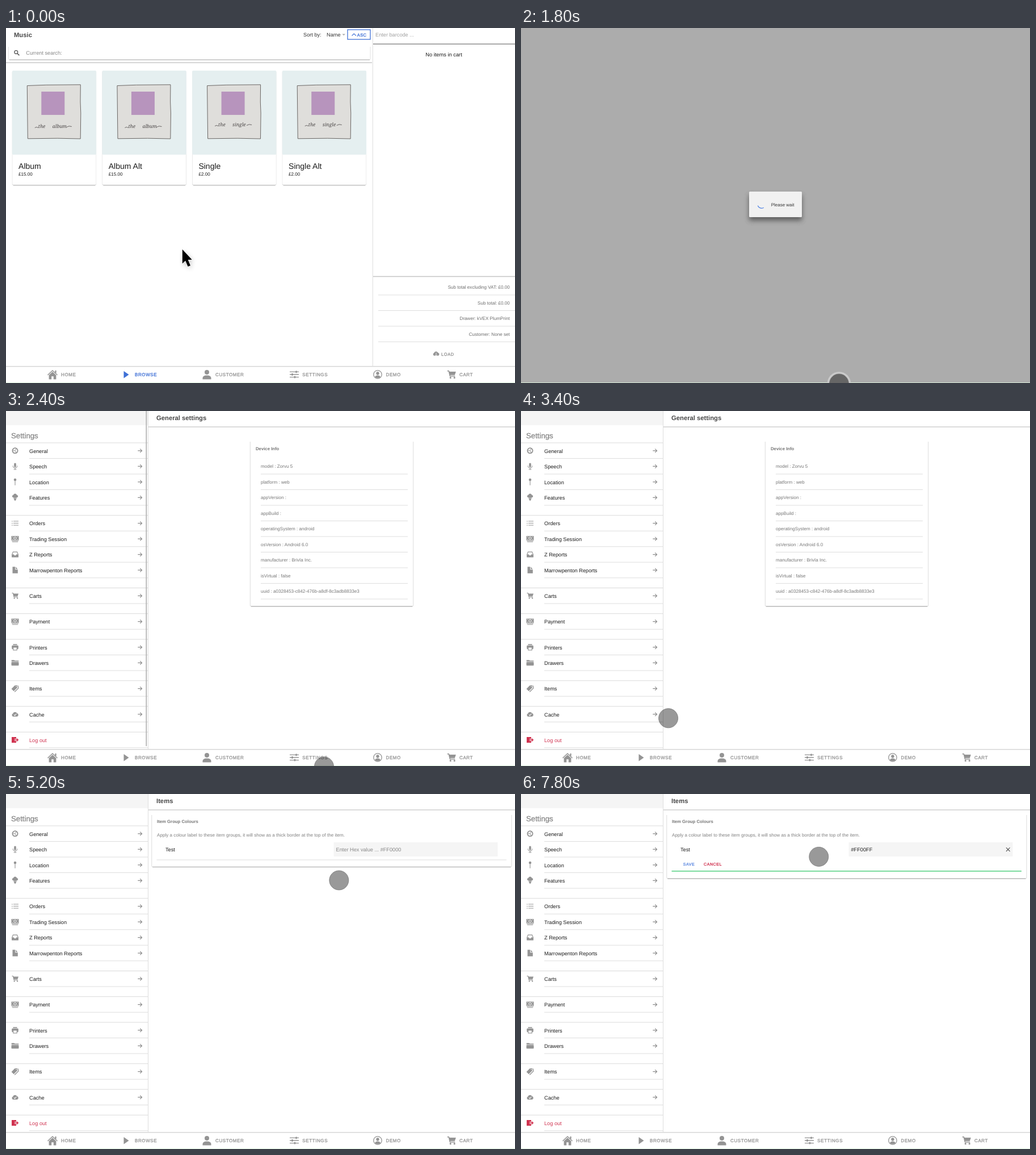
Animation, 897 px wide and 625 px high, one loop 8 s. Source, as an HTML page:

```html
<!DOCTYPE html>
<html lang="en">
<head>
<meta charset="utf-8">
<title>Till settings</title>
<style>
  html, body { margin: 0; width: 100%; height: 100%; overflow: hidden; background: #fff; }
  svg { display: block; width: 100%; height: 100%; font-family: "Liberation Sans", Arial, sans-serif; text-rendering: geometricPrecision; }
  .script { font-family: "Noto Serif", serif; font-style: italic; }
</style>
</head>
<body>
<svg id="stage" viewBox="0 0 897 625" xmlns="http://www.w3.org/2000/svg"></svg>
<script>
const LOOP = 8000, STEP = 200;
const GREY = '#949494', BLUE = '#3f70d6', RED = '#d03350';

// y is the vertical centre of the text
const text = (x, y, s, size = 9.2, fill = '#1c1c1c', more = '') =>
  `<text x="${x}" y="${y + size * 0.35}" font-size="${size}" fill="${fill}" ${more}>${s}</text>`;
const bold = (x, y, s, size, fill) => text(x, y, s, size, fill, 'font-weight="700"');
const label = (x, y, s, size, fill, gap = 0.6) =>
  text(x, y, s, size, fill, `stroke="${fill}" stroke-width=".3" letter-spacing="${gap}"`);
const rect = (x, y, w, h, fill, more = '') =>
  `<rect x="${x}" y="${y}" width="${w}" height="${h}" fill="${fill}" ${more}/>`;
const path = (d, fill = GREY, more = '') => `<path d="${d}" fill="${fill}" ${more}/>`;
const stroke = (d, color = GREY, width = 1, more = '') =>
  `<path d="${d}" fill="none" stroke="${color}" stroke-width="${width}" ${more}/>`;
const hline = (x1, x2, y, color = '#dedede', width = 1) => stroke(`M${x1} ${y}H${x2}`, color, width);
const circle = (x, y, r, fill = GREY, more = '') =>
  `<circle cx="${x}" cy="${y}" r="${r}" fill="${fill}" ${more}/>`;
const at = (x, y, body, scale = 1) => `<g transform="translate(${x} ${y}) scale(${scale})">${body}</g>`;
const group = (id, body) => `<g id="${id}">${body}</g>`;

// Icons are drawn around 0,0
const cloud = path('M-3.5 4.5A3 3 0 0 1-4-1.2A4 4 0 0 1 3.4-1.8A3.2 3.2 0 0 1 3.5 4.5Z');
const note = rect(-6.5, -5, 13, 7.5, GREY) + circle(0, -1.2, 2.2, GREY, 'stroke="#fff"') +
  stroke('M-5-3.5h1.5M3.5-3.5h1.5M-5 1h1.5M3.5 1h1.5', '#fff', 0.8) +
  stroke('M-6 3.7H6M-5 5.4H5', GREY, 0.9);
const cart = stroke('M-7-6h2.6l2 8.6H6', GREY, 1.5) + path('M-4.5-4.8H7.5L5.6 1H-3Z') +
  circle(-1.6, 5.4, 1.5) + circle(5, 5.4, 1.5);
const person = circle(0, -4, 4) + path('M-7.5 8.5V6Q-7 1.5 0 1.5T7.5 6V8.5Z');
const icons = {
  general: circle(0, 0, 4.6, 'none', `stroke="${GREY}" stroke-width="1.8"`) +
    stroke('M-4 0H0L2.2-4M0 0L2.2 4', GREY, 1),
  speech: rect(-1.8, -5.8, 3.6, 7.6, GREY, 'rx="1.8"') + stroke('M-3.8-1V0A3.8 3 0 0 0 3.8 0V-1M0 3V6M-2.4 5.6H2.4'),
  location: circle(0, -3.8, 2.3) + stroke('M0-2V6', GREY, 1.1),
  features: path('M-5-1A2.7 2.7 0 0 1-3-4.6A3.2 3.2 0 0 1 3-4.6A2.7 2.7 0 0 1 5-1Q3 1 0 .6Q-3 1-5-1Z') + path('M-3 1.2H3L0 6.4Z'),
  orders: stroke('M-3-3.5H6M-3 0H6M-3 3.5H6', GREY, 1.1) + stroke('M-5.8-3.5h1.4M-5.8 0h1.4M-5.8 3.5h1.4', GREY, 1.3),
  note,
  tray: stroke('M-5.3 4.4V0L-3.6-4.4H3.6L5.3 0V4.4Z', GREY, 1.2) + path('M-5.5 0H-2Q-1.6 2 0 2T2 0H5.5V4.8H-5.5Z'),
  file: path('M-4.5-5.8H.2V-.8H4.8V5.8H-4.5Z') + path('M1.2-5.6L4.6-1.8H1.2Z'),
  cart: at(0, 0, cart, 0.8),
  printer: rect(-5.8, -3, 11.6, 6.4, GREY, 'rx="1.4"') + rect(-3.6, -5.4, 7.2, 1.7, GREY) +
    rect(-3.2, 0.2, 6.4, 5, '#fff', `stroke="${GREY}" stroke-width="1.1"`),
  folder: path('M-6.3-2V-4.8H-1.6L-.4-3.8H6.3V-2Z') + rect(-6.5, -1.4, 13, 6.4, GREY, 'rx="1"'),
  tags: path('M-6.4.6L-.6-5.2L4-5.8L3.6-1.4L-2.4 4.8Z') + stroke('M5.4-5L5.8-.6L-.8 6', GREY, 1.3) + circle(2, -3.8, 0.8, '#fff'),
  cache: at(0, 0, cloud, 0.95) + stroke('M-2 .8L-.4 2.3L2.3-.8', '#fff', 1.1),
  exit: path('M-6-5H2V-2H-1V2H2V5H-6Z', RED) + stroke('M-1 0H5M2.8-2.4L5.3 0L2.8 2.4', RED, 1.4)
};

const nav = [
  ['HOME', 97, at(82, 610, path('M-9 .5L0-8L9 .5L8 1.6L0-6L-8 1.6Z') +
    path('M-6.4 1.2L0-4.8L6.4 1.2V8.5H1.8V3.2H-1.8V8.5H-6.4Z') + rect(4.4, -7, 2.2, 4.5, GREY))],
  ['CUSTOMER', 369, at(354, 610, person)],
  ['SETTINGS', 522.3, at(508, 610, stroke('M-8-4.6H8M-8 0H8M-8 4.6H8', GREY, 1.4) +
    [[3.5, -4.6], [-3.5, 0], [1, 4.6]].map(([x, y]) => rect(x - 1.3, y - 1.9, 2.6, 3.8, GREY, 'rx="1"')).join(''))],
  ['DEMO', 669.5, at(655, 610, circle(0, 0, 7.2, 'none', `stroke="${GREY}" stroke-width="1.3"`) +
    circle(0, -2, 2.7) + path('M-5 4.4Q-3.6 1.6 0 1.6T5 4.4Q3 6.6 0 6.6T-5 4.4Z'))],
  ['CART', 799, at(785, 610, cart, 1.05)]
];
const browseTab = color => path('M207.5 604L216.5 610.3L207.5 616.5Z', color) + label(227, 610.3, 'BROWSE', 8, color);
const navBar = hline(0, 897, 595.8, '#cfcfcf', 1.3) +
  nav.map(([s, x, icon]) => icon + label(x, 610.3, s, 8, GREY)).join('');

function product(i, name, price, kind) {
  const x = 10.8 + i * 158.65, y = kind === 'album' ? 172.5 : 169.5;
  return rect(x, 75.5, 148.3, 201.5, '#d9d9d9', 'rx="2.5"') + hline(x + 2, x + 146.5, 276.8, '#bdbdbd', 1.2) +
    rect(x + 0.5, 75.5, 147.3, 200.5, '#fff', 'rx="2"') +
    rect(x, 75, 148.3, 148, '#e5eff0', 'rx="2"') +
    at(x, 0, path('M26.5 101.5L60 100.3L120.5 99.8L120.2 130L121 150L120.4 195L80 194.2L27.5 194.8L27 150Z',
      '#dfdedb', 'stroke="#6b6765" stroke-width="1"') +
      rect(51.5, 112, 41, 41, '#b794bd') +
      text(46, y, 'the', 8.6, '#4a4646', 'class="script"') +
      text(71, y, kind, 8.6, '#4a4646', 'class="script"') +
      stroke(`M40 ${y + 3}q3-2 6 0M96 ${y + 2}q4-3 9-1`, '#4a4646', 0.8)) +
    text(x + 11.3, 243, name, 14) + text(x + 11.3, 257.5, price, 8.1);
}

const totals = ['Sub total excluding VAT: £0.00', 'Sub total: £0.00', 'Drawer: kVEX PlumPrint', 'Customer: None set'];
const browse = bold(14, 12.3, 'Music', 11.25, '#484848') +
  text(524, 12, 'Sort by:', 9.2, '#333') + text(565, 12, 'Name', 9.2, '#333') + path('M592.5 10.5H598L595.2 13.3Z', '#aaa') +
  rect(602, 3, 40, 17, '#fff', `stroke="${BLUE}" stroke-width="1.3"`) +
  stroke('M609.5 13.7L613.2 10L616.9 13.7', BLUE, 1.2) + label(618.7, 12, 'ASC', 7.6, BLUE, 0.4) +
  stroke('M4.5 33V54Q4.5 56 6.5 56H640Q642 56 642 54V33', '#dfdfdf', 0.9) + hline(6, 641, 56, '#c6c6c6', 1.4) +
  circle(17.8, 42.6, 2.9, 'none', 'stroke="#555" stroke-width="1.3"') + stroke('M20 45L23.4 48.2', '#555', 1.6) +
  text(35.3, 44, 'Current search:', 9.2, '#858585') + hline(0, 645, 61, '#cacaca', 1.6) +
  product(0, 'Album', '£15.00', 'album') + product(1, 'Album Alt', '£15.00', 'album') +
  product(2, 'Single', '£2.00', 'single') + product(3, 'Single Alt', '£2.00', 'single') +
  stroke('M646.3 0V595', '#dcdcdc') +
  text(651, 12, 'Enter barcode ...', 9.2, '#a0a0a0') + hline(647, 897, 28.3, '#8d8d8d', 1.5) +
  text(771.5, 46.8, 'No items in cart', 9.3, '#1c1c1c', 'text-anchor="middle"') +
  hline(647, 897, 437.6, '#c4c4c4', 1.5) +
  totals.map((s, i) => text(887.7, 456.2 + i * 27.5, s, 8.1, '#6d6d6d', 'text-anchor="end"') +
    hline(656, 897, 470 + i * 27.5)).join('') +
  at(758, 573, cloud, 0.9) + stroke('M758 571.5V577.5M756 575.5L758 577.8L760 575.5', '#fff', 0.8) +
  label(767, 574, 'LOAD', 7.5, GREY) + browseTab(BLUE);

const menu = [
  [['General', 'general'], ['Speech', 'speech'], ['Location', 'location'], ['Features', 'features']],
  [['Orders', 'orders'], ['Trading Session', 'note'], ['Z Reports', 'tray'], ['Marrowpenton Reports', 'file']],
  [['Carts', 'cart']], [['Payment', 'note']],
  [['Printers', 'printer'], ['Drawers', 'folder']],
  [['Items', 'tags']], [['Cache', 'cache']], [['Log out', 'exit']]
];
function sideMenu() {
  let y = 56, out = rect(0, 0, 250, 25, '#f5f5f5') + label(9, 43, 'Settings', 13.2, '#888', 0);
  for (const rows of menu) {
    out += hline(0, 250, y, '#dadada');
    for (const [name, icon] of rows) {
      const mid = y + 14.2, last = icon === 'exit';
      out += at(16, mid - 0.4, icons[icon]) + text(41, mid + 0.2, name, 9.2, last ? RED : '#1c1c1c');
      if (!last) out += stroke(`M232.3 ${mid - 0.3}H239.4M236.2 ${mid - 3.6}L239.6 ${mid - 0.3}L236.2 ${mid + 3}`, '#8c8c8c', 1.1);
      y += 27.5;
      out += hline(41, 250, y);
    }
    y += 17.75;
  }
  return out + stroke('M250.5 0V595', '#dedede') + hline(251, 897, 28, '#cfcfcf', 1.6) + browseTab(GREY);
}

const panel = (x1, x2, top, bottom) =>
  stroke(`M${x1} ${top}V${bottom - 2}Q${x1} ${bottom} ${x1 + 2} ${bottom}H${x2 - 2}Q${x2} ${bottom} ${x2} ${bottom - 2}V${top}`, '#dcdcdc') +
  hline(x1 + 1.5, x2 - 1.5, bottom, '#bdbdbd', 1.5);

const device = ['model : Zorvu 5', 'platform : web', 'appVersion :', 'appBuild :', 'operatingSystem : android',
  'osVersion : Android 6.0', 'manufacturer : Brivla Inc.', 'isVirtual : false', 'uuid : a0328453-c842-476b-a8df-8c3adb8833e3'];
const general = bold(265, 12.5, 'General settings', 11.25, '#484848') + panel(430.3, 717.7, 54, 344) +
  bold(440, 66, 'Device Info', 7.75, '#777') +
  device.map((s, i) => text(449, 97.5 + i * 27.5, s, 8.1, '#777') + hline(449, 708, 111 + i * 27.5)).join('');

const items = bold(265, 12.5, 'Items', 11.25, '#484848') + bold(266, 47.8, 'Item Group Colours', 7.75, '#777') +
  text(266, 72, 'Apply a colour label to these item groups, it will show as a thick border at the top of the item.', 8.15, '#808080') +
  group('empty', text(275, 93.3, 'No Available Item Groups') + hline(275, 882, 106) + panel(256.8, 891, 37, 119)) +
  group('filled', rect(577.5, 85, 289, 25, '#f5f5f5') + text(281, 98, 'Test') +
    text(581.5, 98, '', 9.2, '#888', 'id="hex"') + '<path id="rule" fill="none"/>' +
    group('closed', panel(256.8, 891, 37, 128.5)) +
    group('open', panel(256.8, 891, 37, 149) + label(285.7, 123.3, 'SAVE', 7, '#5b88e0') +
      label(322, 123.3, 'CANCEL', 7, RED) + stroke('M855 94.3L861.6 101M861.6 94.3L855 101', '#555', 1.1)) +
    rect(581.7, 92, 1, 11, '#333', 'id="caret"'));

const wait = rect(0, 0, 897, 625, '#acacac') +
  rect(402, 288, 93, 45, '#444', 'filter="url(#soft)" opacity=".75" transform="translate(0 6)"') +
  rect(402, 288, 93, 45, '#f1f1f1', 'rx="1.5"') +
  stroke('M-6.8 2.6A7.3 7.3 0 0 1-1.5-7.1', '#4d80e4', 1.3, 'id="spinner"') +
  text(440.8, 311, 'Please wait', 7.95, '#333');

const stage = document.getElementById('stage');
stage.innerHTML = '<defs><filter id="soft" x="-30%" y="-60%" width="160%" height="220%"><feGaussianBlur stdDeviation="4.5"/></filter></defs>' +
  rect(0, 0, 897, 625, '#fff') + group('browse', browse) +
  group('settings', sideMenu() + group('general', general) + group('items', items) +
    rect(246.4, 0, 1.8, 590, '#b3b3b3', 'id="scroll"')) +
  navBar + group('wait', wait) + hline(0, 897, 624.7, '#dcf3dc') +
  group('arrow', path('M312 393V418L318 413L322 423L327 421L322 411H330Z', '#000', 'opacity=".25" filter="url(#soft)"') +
    path('M310.8 389.8V414.8L316.2 409.8L320.6 420L325 418.2L320.7 408H327.8Z', '#000', 'stroke="#fff" stroke-width="1.2" paint-order="stroke"')) +
  group('touch', circle(0, 0, 20.8, '#cacaca', 'id="halo"') + circle(0, 0, 17, '#000', 'id="dot" stroke="#777" stroke-width=".8"')) +
  circle(618.8, 102.8, 41, 'none', 'id="ring" stroke="#1a1a1a" stroke-width="1.3"');

const el = {};
stage.querySelectorAll('[id]').forEach(n => el[n.id] = n);
const show = (id, on) => el[id].setAttribute('display', on ? 'inline' : 'none');
const set = (id, attrs) => { for (const k in attrs) el[id].setAttribute(k, attrs[k]); };

const smooth = u => u * u * (3 - 2 * u);
const slow = u => 1 - (1 - u) ** 2.8;
const linear = u => u;
const moves = [
  [400, 1400, 318, 369, 560.5, 626, smooth],
  [2600, 3800, 560.5, 626, 154.3, 511, smooth],
  [4400, 5800, 154.3, 511, 631.3, 115, slow],
  [7400, 7800, 631.3, 115, 524.8, 110.4, linear]
];
function touchAt(t) {
  const [t0, t1, x0, y0, x1, y1, ease] = moves.filter(m => t >= m[0]).pop() || moves[0];
  const k = ease(Math.max(0, Math.min(1, (t - t0) / (t1 - t0))));
  return [x0 + (x1 - x0) * k, y0 + (y1 - y0) * k];
}

function draw(time) {
  const t = Math.floor(time / STEP) * STEP;
  const within = (a, b) => t >= a && t < b;
  const waiting = within(1800, 2400), focused = t >= 6200, typed = t >= 7000;

  show('browse', t < 1800);
  show('settings', t >= 2400);
  show('general', t < 4200);
  show('items', t >= 4200);
  show('empty', t < 4600);
  show('filled', t >= 4600);
  show('closed', !typed);
  show('open', typed);
  show('wait', waiting);
  set('spinner', { transform: `translate(424 310) rotate(${(t - 2000) * 0.5})` });
  show('scroll', within(2400, 2800));
  set('scroll', { opacity: t < 2600 ? 1 : 0.5 });

  el.hex.textContent = typed ? '#FF00FF' : 'Enter Hex value ... #FF0000';
  set('hex', { fill: typed ? '#222' : '#888' });
  set('rule', {
    d: `M265.5 ${typed ? 135.8 : 116}H882`,
    stroke: focused ? '#52cf80' : '#dedede',
    'stroke-width': focused ? 1.6 : 1
  });
  show('caret', within(6200, 6600) || within(7000, 7600));
  set('caret', { x: typed ? 619.5 : 581.7 });

  show('arrow', t < 400);
  show('touch', t >= 400);
  show('halo', waiting);
  set('dot', { fill: waiting ? '#666' : '#000', 'fill-opacity': waiting ? 1 : 0.4 });
  const [x, y] = touchAt(t);
  set('touch', { transform: `translate(${x} ${y})` });
  show('ring', within(6000, 6200));
}

function tick(now) {
  draw(now % LOOP);
  requestAnimationFrame(tick);
}
draw(0);
requestAnimationFrame(tick);
</script>
</body>
</html>
```
